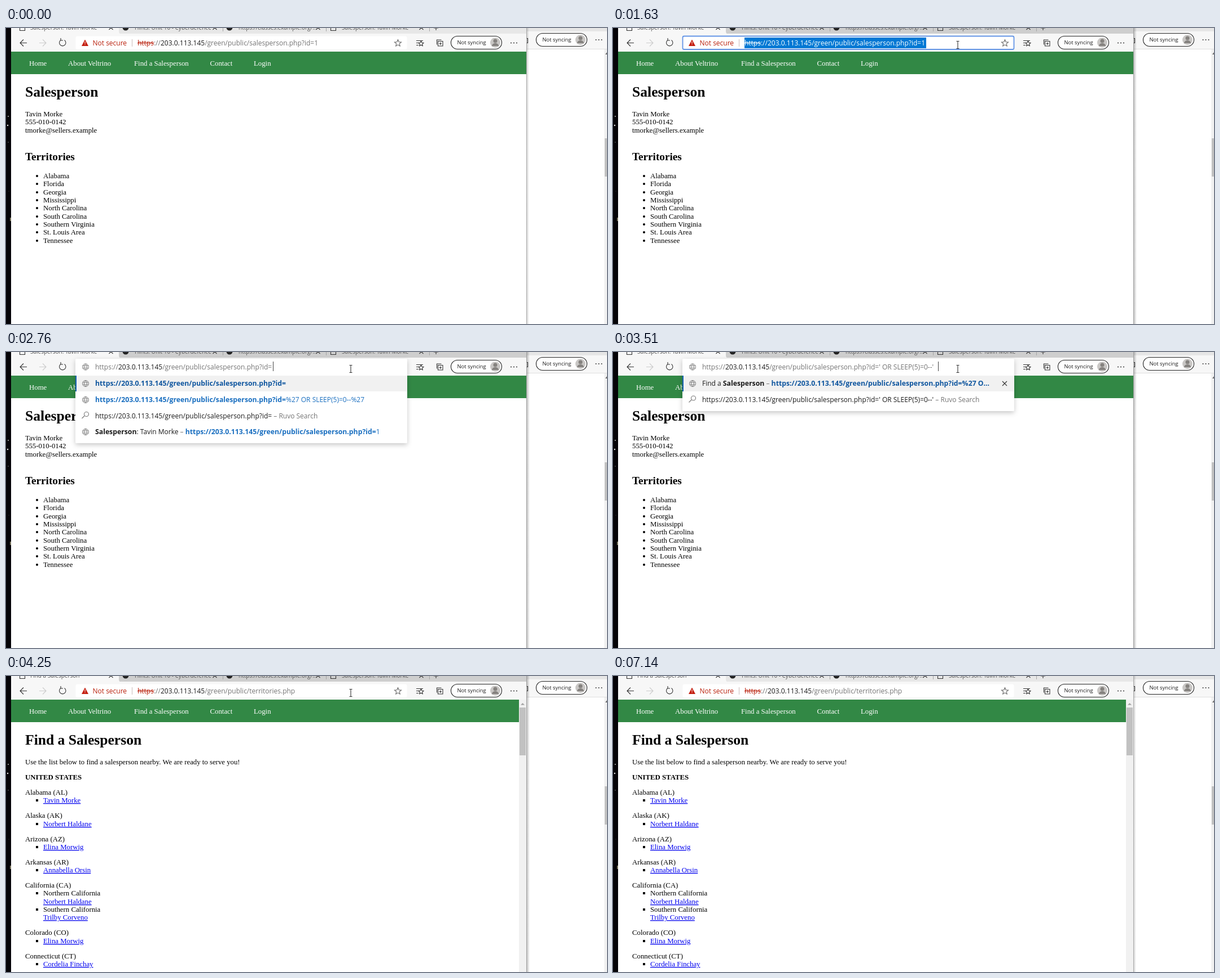
An HTML page for the animation above (7.26 s loop, 1065 by 526 pixels).

```html
<!DOCTYPE html>
<html lang="en">
<head>
<meta charset="utf-8">
<title>Browser session</title>
<style>
  html, body { margin: 0; width: 100%; height: 100%; overflow: hidden; background: #fff; }
  svg { display: block; width: 1065px; height: 526px; }
  text { white-space: pre; font-variant-ligatures: none; }
  .ui { font: 12px "Open Sans", "Noto Sans", sans-serif; fill: #1b1b1b; }
  .small { font-size: 9.4px; }
  .tab { font-size: 10px; fill: #555; }
  .page { font: 12.8px "Liberation Serif", "Times New Roman", serif; fill: #000; }
  .h1 { font-size: 25.6px; font-weight: 700; }
  .h2 { font-size: 19.2px; font-weight: 700; }
  .bold { font-weight: 700; }
  .match { font-weight: 700; font-size: 12.25px; }
  .nav { fill: #fff; }
  .link { fill: #00e; text-decoration: underline; }
  .grey { fill: #747474; }
  .blue { fill: #1a6fc0; }
  .deep { fill: #0f569f; }
  .red { fill: #b9200c; }
  .strike { text-decoration: line-through; }
  .selected tspan { fill: #fff; }
  .icon { fill: none; stroke: #333; stroke-width: 1.1; }
</style>
</head>
<body>
<svg id="stage" viewBox="0 0 1065 526"></svg>
<script>
const LOOP = 7260, ROW = 14.32;
const HOST = '203.0.113.145', FOLDER = '/green/public/';
const PROFILE = 'salesperson.php?id=', INJECTION = "' OR SLEEP(5)=0--'";
const FULL = `https://${HOST}${FOLDER}${PROFILE}`;
const PERSON = 'Tavin Morke';

// Pointer positions: start time, x, y, shape
const POINTER = [
  [0, 0, 0, ''], [130, 911, 485, 'arrow'], [240, 753, 317, 'arrow'],
  [510, 722, 246, 'arrow'], [635, 664, 118, 'arrow'], [760, 629, 48, 'arrow'],
  [1010, 611, 30, 'beam'], [5760, 808, 225, 'arrow'], [5900, 832, 274, 'arrow'],
  [6020, 866, 344, 'arrow'], [6130, 887, 389, 'arrow'], [7140, 0, 0, '']
];

// Address bar modes by start time
const MODES = [
  [0, 'plain'], [1120, 'selected'], [2380, 'caret'], [2760, 'typed'],
  [3510, 'pasted'], [3870, 'plain'], [5760, 'selected'], [7140, 'plain']
];

const TERRITORIES = ['Alabama', 'Florida', 'Georgia', 'Mississippi', 'North Carolina',
  'South Carolina', 'Southern Virginia', 'St. Louis Area', 'Tennessee'];

const STATES = [
  ['Alabama (AL)', [PERSON]],
  ['Alaska (AK)', ['Norbert Haldane']],
  ['Arizona (AZ)', ['Elina Morwig']],
  ['Arkansas (AR)', ['Annabella Orsin']],
  ['California (CA)', ['Norbert Haldane', 'Northern California'], ['Trilby Corveno', 'Southern California']],
  ['Colorado (CO)', ['Elina Morwig']],
  ['Connecticut (CT)', ['Cordelia Finchay']]
];

const at = (list, t) => list.filter(step => step[0] <= t).pop();
const text = (x, y, content, cls = 'ui') => `<text x="${x}" y="${y}" class="${cls}">${content}</text>`;
const page = (x, y, content, cls = '') => text(x, Math.round(y), content, 'page ' + cls);
const span = (content, cls = '') => `<tspan class="${cls}">${content}</tspan>`;
const rect = (x, y, w, h, fill, extra = '') =>
  `<rect x="${x}" y="${y}" width="${w}" height="${h}" fill="${fill}" ${extra}/>`;
const circle = (x, y, r, fill) => `<circle cx="${x}" cy="${y}" r="${r}" fill="${fill}"/>`;
const icon = (d, extra = '') => `<path class="icon" d="${d}" ${extra}/>`;
const cross = (x, y, r) => icon(`M${x - r} ${y - r}l${2 * r} ${2 * r}m0 ${-2 * r}l${-2 * r} ${2 * r}`);
const dots = (x, y) => [0, 5, 10].map(d => circle(x + d, y, 1, '#333')).join('');

function pill(x, y) {
  return rect(x + .5, y + .5, 90, 23, '#fff', 'rx="11.5" stroke="#222" stroke-width="1.1"')
    + text(x + 11.5, y + 15.3, 'Not syncing', 'ui small')
    + circle(x + 79, y + 12, 9, '#c9c7c5') + circle(x + 79, y + 9, 3.5, '#85827f')
    + `<path d="M${x + 73} ${y + 18}a6 5 0 0 1 12 0z" fill="#85827f"/>`;
}

function star(x, y) {
  const points = Array.from({ length: 10 }, (_, i) => {
    const r = i % 2 ? 2.8 : 6.3, a = i * Math.PI / 5;
    return `${(x + r * Math.sin(a)).toFixed(1)},${(y - r * Math.cos(a)).toFixed(1)}`;
  });
  return `<polygon class="icon" style="stroke:#666" points="${points.join(' ')}"/>`;
}

const globe = y => `<g transform="translate(141 ${y})">`
  + icon('M-5.5 0a5.5 5.5 0 1 0 11 0a5.5 5.5 0 1 0 -11 0M-5 -2H5M-5 2H5M0 -5.5q-5 5.5 0 11q5 -5.5 0 -11',
    'style="stroke:#777;stroke-width:.9"') + '</g>';
const lens = y => icon(`M139 ${y + 1}l-4.5 4.5M138.5 ${y - 2}a4 4 0 1 0 8 0a4 4 0 1 0 -8 0`, 'style="stroke:#777"');

function background() {
  return rect(0, 0, 9, 526, '#050408')
    + circle(4, 157, 1, '#bbb') + circle(3, 173, 1.2, '#eee') + circle(4, 203, .8, '#777')
    + circle(5, 290, .6, '#444') + rect(7, 337, 2, 6, '#77735c')
    + rect(922, 0, 143, 7, '#e6e6e6') + rect(922, 6, 143, 31, '#f7f7f7') + rect(922, 37, 143, 1, '#dedede')
    + rect(922, 38, 143, 488, '#fff') + icon('M921 18.5h3.5v8h-3.5')
    + pill(939, 9) + dots(1045.5, 21)
    + rect(1060, 38, 5, 488, '#f1f1f1') + rect(1061, 196, 4, 68, '#c1c1c1')
    + '<path d="M1062 47l3-4v4z" fill="#666"/>';
}

function tabStrip(focus, title) {
  const shade = Math.round(231 - 25 * focus);
  const pageIcon = x => icon(`M${x} -4v8.5h9v-8.5`);
  const firstTitle = `Salesperson: ${PERSON}`;
  return rect(9, 0, 913, 12, `rgb(${shade},${shade},${shade})`)
    + '<path d="M9 0H200V6q0 5 5 5H9z" fill="#f7f7f7"/>'
    + pageIcon(24.5) + text(43, 2.5, title || firstTitle, 'ui tab')
    + circle(212, -1, 5.5, '#222') + text(228, 2.5, 'Hints: Unit 10 - Cyberdefence', 'ui tab')
    + circle(396, -1, 5.5, '#222') + text(412, 2.5, 'https://classes.example.org/...', 'ui tab')
    + pageIcon(575.5) + text(595, 2.5, firstTitle, 'ui tab')
    + [186, 370, 553, 736].map(x => cross(x, -.5, 3.5)).join('')
    + [384, 567, 750].map(x => rect(x, 0, 1, 6, '#a5a5a5')).join('')
    + icon('M758 0h8M762 -4v8');
}

function toolbar() {
  return rect(9, 10, 913, 32, '#f7f7f7')
    + icon('M37 26.5H25m6 -6l-6 6l6 6')
    + icon('M59 26.5H71m-6 -6l6 6l-6 6', 'style="stroke:#ccc"')
    + icon('M97 21.5a5.7 5.7 0 1 0 6.5 0M97 18v4h4')
    + icon('M727 22.5h12M727 26.5h4M727 30.5h4M735.5 23l1.4 3l3.1 .4l-2.3 2.2l.6 3.2l-2.8 -1.6l-2.8 1.6l.6 -3.2l-2.3 -2.2l3.1 -.4z')
    + icon('M763.5 29.5v-8.5h8M765.5 23.5h8.5v8.5h-8.5zM767.5 27.8h4.5M769.8 25.5v4.5')
    + pill(788, 14) + dots(895, 26.5);
}

function addressBar(mode, file, end) {
  const selected = mode === 'selected';
  const ring = selected || mode === 'caret';
  return rect(123.5, 14.5, 587, 23.5, '#fff', ring ? 'rx="2.5" stroke="#6495e6" stroke-width="1.8"' : 'rx="3"')
    + '<path d="M140 20.5l6 11.5h-12z" fill="#c41e0e"/>' + rect(139.5, 24, 1, 4, '#fff') + rect(139.5, 29, 1, 1, '#fff')
    + text(153.5, 31, 'Not secure', 'ui red') + rect(223, 20, 1, 13, '#c9bcb9')
    + (selected ? rect(233, 17, end - 233, 19, '#0078d4') : '')
    + text(233, 31, span('https', 'red strike') + span('://', 'grey') + span(HOST) + span(FOLDER + file, 'grey'),
      selected ? 'ui selected' : 'ui')
    + (mode === 'caret' ? rect(555, 17, 1, 18, '#444') : '')
    + star(694.5, 27);
}

function dropdown(pasted, caretOn) {
  const bottom = pasted ? 105 : 162;
  const typed = PROFILE + (pasted ? INJECTION : '');
  const dash = span(' – ', 'grey');
  const search = y => lens(y - 5)
    + text(158, y, `https://${HOST}${FOLDER}${typed}` + dash + span('Ruvo Search', 'grey'));
  const rows = pasted
    ? globe(56) + text(158, 60.3, 'Find a ' + span('Salesperson', 'match') + dash
        + span(FULL + '%27 O…', 'match deep')) + cross(694, 56, 4) + search(89)
    : globe(56) + text(158, 60.3, span(FULL, 'match deep'))
      + globe(85) + text(158, 89, span(FULL, 'match blue') + span('%27 OR SLEEP(5)=0--%27', 'blue'))
      + search(117.5)
      + globe(142) + text(158, 146.3, span('Salesperson', 'match') + `: ${PERSON}` + dash
        + span(FULL, 'match blue') + span('1', 'blue'));
  return rect(123, 12, 588, bottom - 12, '#fff', 'rx="2" filter="url(#popup)"')
    + rect(123, 42, 588, 28, '#f1f1f1') + rect(123, 42, 2, 28, '#1a62b5')
    + globe(26.5) + text(158, 31, span('https://', 'grey') + HOST + span(FOLDER + typed, 'grey'))
    + (caretOn ? rect(pasted ? 576 : 473, 17, 1, 17, '#444') : '') + rows;
}

function navigation() {
  const items = [[41, 'Home'], [110, 'About Veltrino'], [227, 'Find a Salesperson'], [361.5, 'Contact'], [439, 'Login']];
  return rect(9, 42, 913, 40, '#328845') + items.map(([x, label]) => page(x, 67, label, 'nav')).join('');
}

function profilePage() {
  return page(34, 122, 'Salesperson', 'h1')
    + [PERSON, '555-010-0142', 'tmorke@sellers.example'].map((s, i) => page(34, 157 + i * ROW, s)).join('')
    + page(34, 235, 'Territories', 'h2')
    + TERRITORIES.map((s, i) => {
      const y = Math.round(267 + i * ROW);
      return page(66, y, s) + circle(55, y - 4, 2, '#000');
    }).join('');
}

function territoriesPage() {
  let y = 211, out = page(34, 122, 'Find a Salesperson', 'h1')
    + page(34, 157, 'Use the list below to find a salesperson nearby. We are ready to serve you!')
    + page(34, 184, 'UNITED STATES', 'bold');
  for (const [state, ...areas] of STATES) {
    out += page(34, y, state);
    for (const [person, area] of areas) {
      y += ROW;
      out += rect(53, Math.round(y) - 6, 4, 4, '#000');
      if (area) {
        out += page(66, y, area);
        y += ROW;
      }
      out += page(66, y, person, 'link');
    }
    y += ROW + 12.64;
  }
  return out + rect(909, 42, 13, 484, '#f1f1f1') + rect(910, 56, 11, 85, '#c1c1c1')
    + '<path d="M912 51.5l3.5 -3.5l3.5 3.5z" fill="#a0a0a0"/>';
}

function pointer([, x, y, shape]) {
  if (shape === 'arrow') return `<path transform="translate(${x} ${y})"
    d="M.5 .5V12.5l2.7 -2.5l2 4.8l2.1 -.9l-2 -4.6h3.7z" fill="#fff" stroke="#4467ad" stroke-width=".9"/>`;
  if (shape === 'beam') return icon(`M${x - 2.5} ${y - 6.5}h2l.5 .5l.5 -.5h2M${x} ${y - 6}v12M${x - 2.5} ${y + 6.5}h2l.5 -.5l.5 .5h2`);
  return '';
}

function scene(t) {
  const mode = at(MODES, t)[1];
  const arrived = t >= 4000;
  const active = t >= 1260 && t < 7140;
  const focus = active ? Math.min(1, (t - 1140) / 490) : 0;
  const file = arrived ? 'territories.php' : PROFILE + (t >= 3870 ? INJECTION : '1');
  const open = mode === 'typed' || mode === 'pasted';
  return `<defs>
      <filter id="popup" x="-5%" y="-10%" width="110%" height="125%">
        <feDropShadow dx="0" dy="3" stdDeviation="4" flood-opacity=".22"/></filter>
      <linearGradient id="edge"><stop stop-opacity="${active ? .28 : .2}"/><stop offset="1" stop-opacity="0"/></linearGradient>
    </defs>`
    + background() + rect(9, 0, 913, 526, '#fff')
    + rect(922, 0, active ? 6 : 5, 526, 'url(#edge)') + rect(922, 0, 1, 526, active ? '#a0a0a0' : '#aaa')
    + tabStrip(focus, arrived && 'Find a Salesperson') + toolbar()
    + navigation() + (arrived ? territoriesPage() : profilePage())
    + (open ? dropdown(mode === 'pasted', t < 3260 || t >= 3510) : addressBar(mode, file, arrived ? 512 : 555))
    + pointer(at(POINTER, t));
}

const stage = document.getElementById('stage');
let drawn = '';
function frame() {
  const markup = scene(performance.now() % LOOP);
  if (markup !== drawn) stage.innerHTML = drawn = markup;
  requestAnimationFrame(frame);
}
frame();
</script>
</body>
</html>
```
